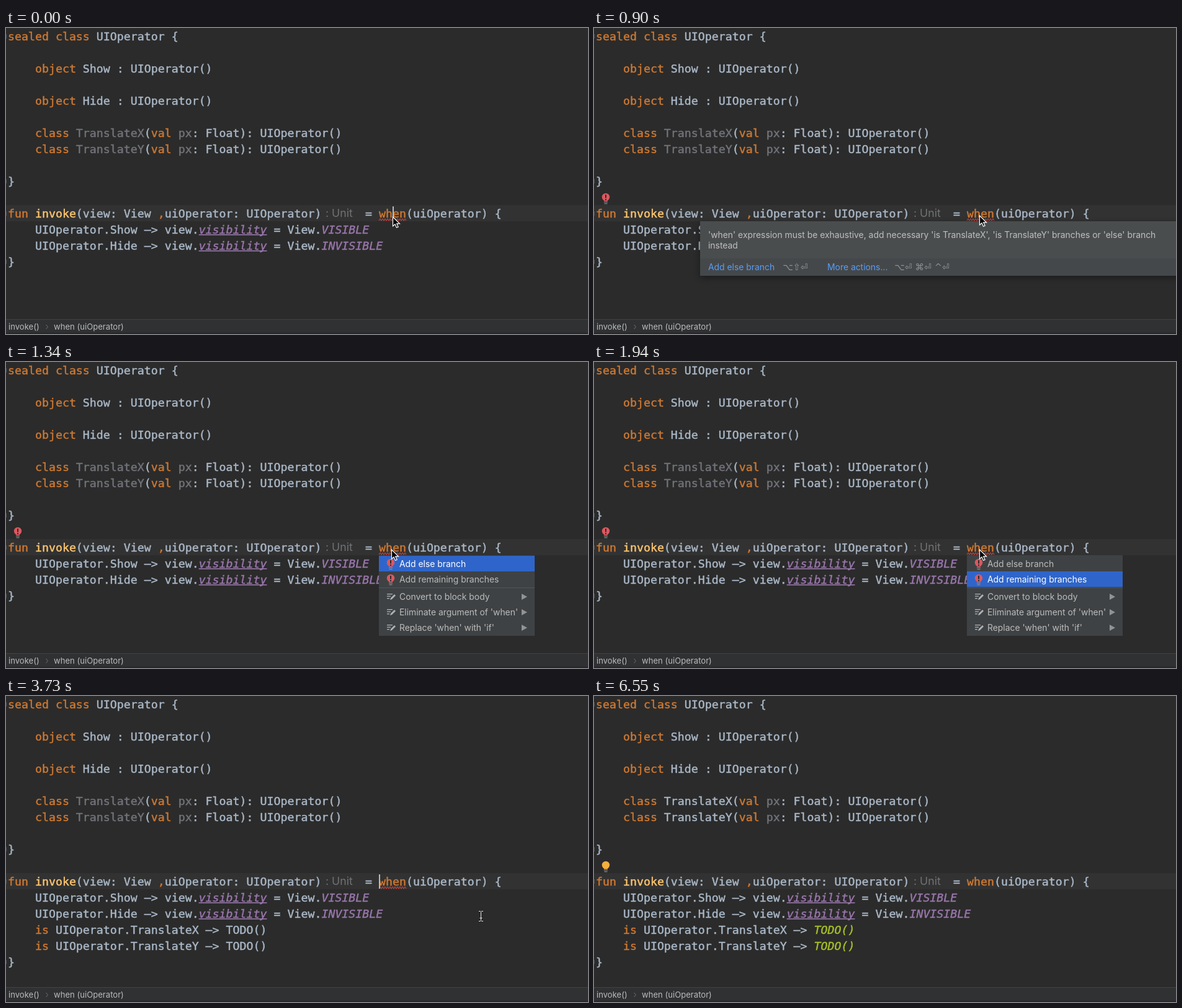
An HTML page with a canvas that plays this animation: 938x494 px, repeating every 6650 ms.

```html
<!DOCTYPE html>
<html lang="en">
<head>
<meta charset="utf-8">
<style>
html, body { margin: 0; width: 100%; height: 100%; overflow: hidden; background: #2b2b2b; }
canvas { display: block; }
</style>
</head>
<body>
<canvas id="stage" width="938" height="494"></canvas>
<script>
const ctx = document.getElementById('stage').getContext('2d');
const LOOP = 6650, LINE = 26, CHAR = 10.987;
const MONO = '18.25px "DejaVu Sans Mono", monospace';
const UI = 'Inter, sans-serif';
const SYMBOLS = '"DejaVu Sans", sans-serif';
const PLAIN = '#a9b7c6', GREY = '#72737a';

const DECLARATIONS = [
  'sealed class UIOperator {', '',
  '    object Show : UIOperator()', '',
  '    object Hide : UIOperator()', '',
  '    class TranslateX(val px: Float): UIOperator()',
  '    class TranslateY(val px: Float): UIOperator()', '',
  '}', '',
  'fun invoke(view: View ,uiOperator: UIOperator)',
  '    UIOperator.Show –> view.visibility = View.VISIBLE',
  '    UIOperator.Hide –> view.visibility = View.INVISIBLE'
];
const ADDED = [
  '    is UIOperator.TranslateX –> TODO()',
  '    is UIOperator.TranslateY –> TODO()'
];

// Times at which the pointer jumps: [ms, x, y, shape]
const POINTER = [
  [0, 623.5, 305, arrow], [150, 621.5, 303, arrow],
  [2380, 660, 319, arrow], [2530, 730, 343, arrow], [2680, 796, 363, arrow],
  [2830, 777, 360, arrow], [2980, 765, 356, arrow], [3730, 765.5, 355.5, beam],
  [4480, 735, 366, beam], [4630, 610, 382, beam], [4770, 533.5, 388.5, beam],
  [5520, 590, 400, beam], [5670, 715, 430, beam], [5820, 845, 457, beam],
  [5960, 911, 473, arrow], [6260, 0, 0, null]
];
// Caret visibility: [ms, x or 0 when hidden]
const CARET = [
  [0, 624], [600, 0], [1190, 602], [1340, 0], [3580, 602],
  [4630, 0], [5220, 602], [5670, 0], [6260, 602], [6550, 0]
];

const latest = (track, t) => track.findLast(key => key[0] <= t);
const within = (t, from, to) => t >= from && t < to;

function rect(x, y, w, h, color) {
  ctx.fillStyle = color;
  ctx.fillRect(x, y, w, h);
}

// A thin outline in the same colour gives the heavier look of smoothed glyphs.
function text(str, x, y, font, color, weight = 0) {
  ctx.font = font;
  ctx.fillStyle = ctx.strokeStyle = color;
  ctx.fillText(str, x, y);
  if (weight) {
    ctx.lineWidth = weight;
    ctx.strokeText(str, x, y);
  }
}

function path(points, { fill, stroke, width = 1, close = false }) {
  ctx.beginPath();
  points.forEach(([x, y]) => ctx.lineTo(x, y));
  if (close) ctx.closePath();
  if (fill) { ctx.fillStyle = fill; ctx.fill(); }
  if (stroke) { ctx.strokeStyle = stroke; ctx.lineWidth = width; ctx.stroke(); }
}

function at(x, y, draw) {
  ctx.save();
  ctx.translate(x, y);
  draw();
  ctx.restore();
}

function tokenStyle(token, previous, resolved) {
  if (/^(sealed|class|object|val|fun|when|is|,)$/.test(token)) return ['#cc7832'];
  if (token === 'invoke') return ['#ffc66d'];
  if (token === 'px') return [GREY];
  if (/^Translate/.test(token) && previous === 'class' && !resolved) return [GREY];
  if (/^(visibility|(IN)?VISIBLE)$/.test(token)) return ['#9876aa', true];
  if (token === 'TODO()' && resolved) return ['#a8c023', true];
  return [PLAIN];
}

function codeLine(str, x, row, resolved) {
  const y = row * LINE + 20;
  let previous = '';
  for (const { 0: token, index } of str.matchAll(/TODO\(\)|\w+|,|[^\w\s,]+/g)) {
    const [color, italic] = tokenStyle(token, previous, resolved);
    const left = x + index * CHAR;
    text(token, left, y, (italic ? 'italic ' : '') + MONO, color, 0.45);
    if (token === 'visibility') rect(left, y + 1, token.length * CHAR, 1.6, color);
    previous = token;
  }
}

function foldMark(row) {
  rect(0, row * LINE + 10, 1, 7, '#505355');
}

function bulb(x, y, color, alert) {
  at(x, y, () => {
    ctx.fillStyle = color;
    ctx.beginPath();
    ctx.arc(0, -2, 6.2, 0, 7);
    ctx.fill();
    rect(-3, 2, 6, 2.5, color);
    rect(-3, 5.5, 6, 1.2, '#8a8d90');
    rect(-2.5, 8, 5, 1.2, '#8a8d90');
    if (alert) {
      rect(-1, -6, 2, 5.5, '#2b2b2b');
      rect(-1, 1, 2, 2, '#2b2b2b');
    }
  });
}

function wave(x, y, width) {
  const points = Array.from({ length: width / 2 + 1 }, (_, i) => [x + i * 2, y + (i % 2 ? -3 : 0)]);
  path(points, { stroke: '#c8423c', width: 1.1 });
}

function arrow() {
  path([[0, 0], [0, 15], [3.5, 11.8], [6, 17.3], [8.6, 16.2], [6.2, 10.8], [11, 10.8]],
    { fill: '#000', stroke: '#fff', width: 1.2, close: true });
}

function beam() {
  const style = { stroke: '#e8e8e8', width: 1 };
  path([[0, -7], [0, 7]], style);
  for (const side of [-1, 1]) {
    for (const end of [-1, 1]) path([[0, end * 7], [side, end * 8], [side * 3.5, end * 8]], style);
  }
  path([[-2, 3], [2, 3]], style);
}

function tooltip() {
  const body = '13.9px ' + UI, keys = '14.5px ' + SYMBOLS;
  ctx.save();
  ctx.shadowColor = 'rgba(0, 0, 0, 0.4)';
  ctx.shadowBlur = 10;
  ctx.shadowOffsetY = 3;
  rect(171, 312, 780, 88, '#4a4d4e');
  ctx.restore();
  rect(171, 372, 767, 28, '#45484a');
  text("'when' expression must be exhaustive, add necessary 'is TranslateX', 'is TranslateY' branches or 'else' branch",
    184, 339, body, '#bfbfbf');
  text('instead', 184, 356, body, '#bfbfbf');
  text('Add else branch', 184, 391, body, '#589df6');
  text('⌥⇧⏎', 304, 391, keys, '#919395');
  text('More actions...', 376, 391, body, '#589df6');
  text('⌥⏎ ⌘⏎ ^⏎', 484, 391, keys, '#919395');
}

function pencil(x, y) {
  at(x, y, () => {
    for (const [dy, w] of [[-5, 9], [-1.5, 6], [2, 4]]) rect(-7, dy, w, 1.3, '#afb1b3');
    path([[-2, 5], [-1, 2], [5, -4], [7, -2], [1, 4]], { fill: '#afb1b3', close: true });
  });
}

function menu(selected) {
  const items = ['Add else branch', 'Add remaining branches', 'Convert to block body',
    "Eliminate argument of 'when'", "Replace 'when' with 'if'"];
  rect(601, 312, 251, 130, '#3f4244');
  rect(601, 364, 251, 1, '#515456');
  items.forEach((label, i) => {
    const y = 326 + i * 25 + (i > 1 ? 3 : 0), active = i === selected;
    if (active) rect(601, y - 13, 251, 25, '#2f65ca');
    if (i < 2) bulb(620, y, '#db5860', true);
    else {
      pencil(621, y);
      path([[831, y - 5], [840, y], [831, y + 5]], { fill: '#919395', close: true });
    }
    text(label, 634, y + 5, '13.9px ' + UI, active ? '#fff' : '#bbb');
  });
}

function breadcrumbs() {
  const font = '13.1px ' + UI;
  rect(0, 470, 938, 24, '#2f3133');
  rect(0, 470, 938, 1, '#414345');
  rect(0, 492, 938, 2, '#282629');
  text('invoke()', 4, 487, font, '#bbb');
  path([[64.5, 479], [67.5, 482.5], [64.5, 486]], { stroke: '#6e7072' });
  text('when (uiOperator)', 77, 487, font, '#bbb');
}

function draw(t) {
  const inserted = t >= 3580, resolved = t >= 4030;
  rect(0, 0, 938, 494, '#2b2b2b');
  rect(0, 286, 938, 26, '#323232');

  const lines = [...DECLARATIONS, ...(inserted ? ADDED : []), '}'];
  lines.forEach((line, row) => codeLine(line, 3, row, resolved));
  codeLine('= when(uiOperator) {', 579, 11, resolved);
  text(': Unit', 515, 305, '17.7px ' + UI, '#707274');
  [0, 9, 11, lines.length - 1].forEach(foldMark);
  if (!resolved) wave(601, 311, 44);
  breadcrumbs();

  if (within(t, 300, 1050) || within(t, 1340, 3580)) bulb(19, 275, '#db5860', true);
  if (t >= 4480) bulb(19, 275, '#f4af3d', false);
  const caretX = latest(CARET, t)[1];
  if (caretX) rect(caretX - 1, 288, 2, 23, '#bbb');
  if (within(t, 900, 1050)) tooltip();
  if (within(t, 1340, 3580)) menu(t < 1940 ? 0 : 1);

  const [, x, y, shape] = latest(POINTER, t);
  if (shape) at(x, y, shape);
}

const start = performance.now();
function tick() {
  draw((performance.now() - start) % LOOP);
  requestAnimationFrame(tick);
}
tick();
</script>
</body>
</html>
```
